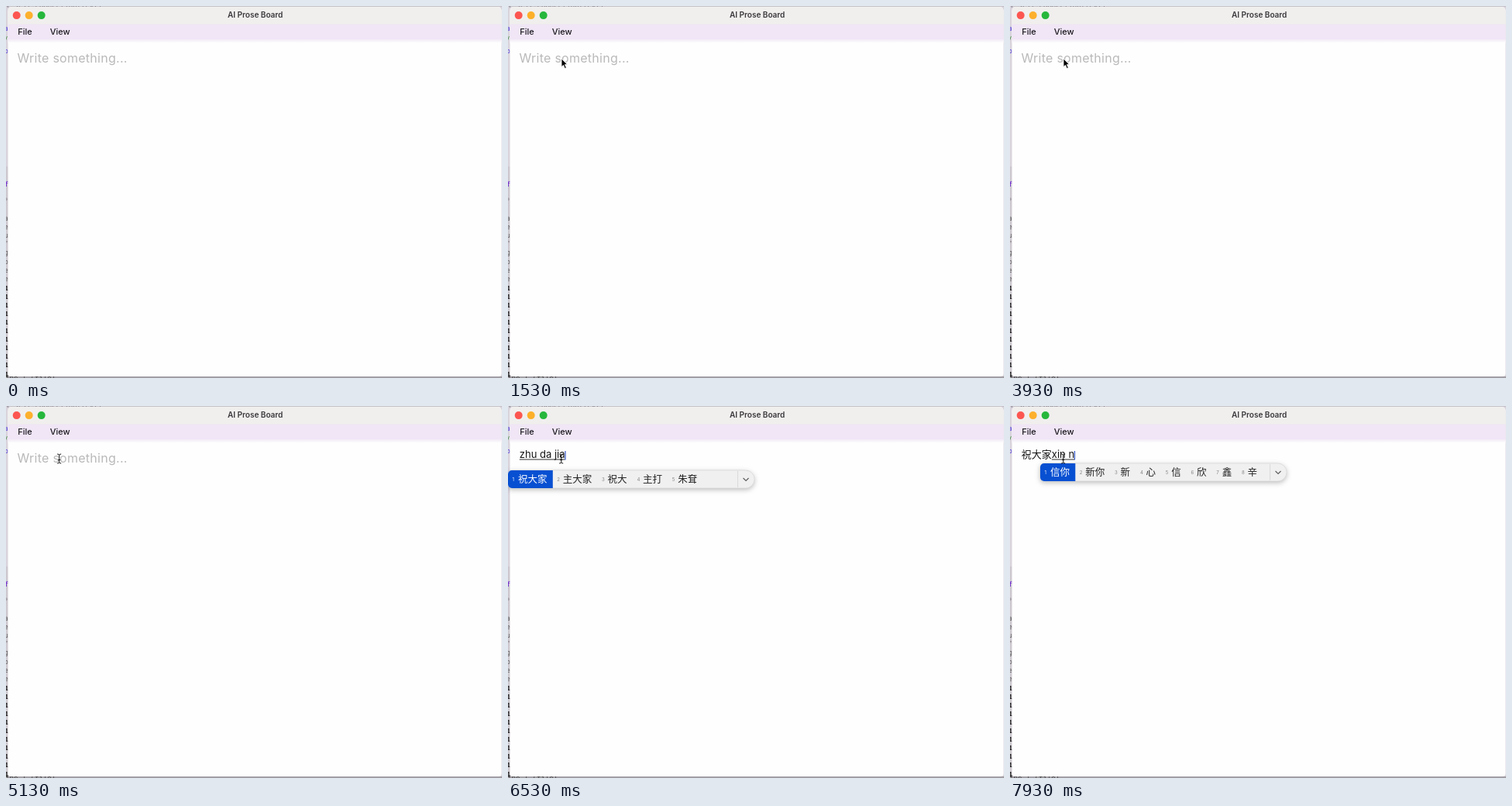
Animation of 640x480 px, one loop 8 s. Source, as an HTML page:

```html
<!DOCTYPE html>
<html lang="zh-CN">
<head>
<meta charset="utf-8">
<title>AI Prose Board</title>
<style>
html, body { margin: 0; width: 100%; height: 100%; overflow: hidden; background: #fefefe; }
svg { display: block; width: 640px; height: 480px; }
text { font-family: Inter, "Noto Sans CJK SC", "Noto Sans CJK", sans-serif; white-space: pre; }
#behind text { font: 9px "Noto Sans Mono", monospace; text-anchor: end; }
#hint { font-size: 16px; letter-spacing: .27px; fill: #b9b9b9; }
.menu { font-size: 11px; font-weight: 500; fill: #1d1a20; }
.typed { font-size: 13px; fill: #161616; }
.digit { font-size: 6px; fill: #858585; }
.word { font-size: 12.5px; fill: #222; }
.chosen { fill: #fff; }
#popup { filter: drop-shadow(0 2px 3px rgba(0, 0, 0, .25)); }
</style>
</head>
<body>
<svg id="stage" viewBox="0 0 640 480" xmlns="http://www.w3.org/2000/svg">
  <defs>
    <linearGradient id="fade" x2="0" y2="1">
      <stop stop-color="#f3ecf7"/><stop offset="1" stop-color="#fefefe"/>
    </linearGradient>
  </defs>
  <rect width="640" height="480" fill="#d9d3dc"/>
  <rect width="640" height="1" fill="#c6c2c8"/>
  <rect y="207" width="4" height="273" fill="#cdc8cf"/>
  <rect y="478" width="640" height="2" fill="#a29ea4"/>
  <g id="behind"></g>
  <path d="M2.500 474V6a5 5 0 0 1 5-5H634.500a5 5 0 0 1 5 5V474a4 4 0 0 1-4 4H6.500a4 4 0 0 1-4-4z" fill="#fefefe"/>
  <path d="M2.500 24V6a5 5 0 0 1 5-5H634.500a5 5 0 0 1 5 5V24z" fill="#f0efee"/>
  <rect x="2.500" y="23.500" width="637" height="20" fill="#f0e6f6"/>
  <rect x="2.500" y="43.500" width="637" height="4" fill="url(#fade)"/>
  <circle cx="13.700" cy="12.100" r="5" fill="#fc5650"/>
  <circle cx="29.700" cy="12.100" r="5" fill="#fcb02c"/>
  <circle cx="45.700" cy="12.100" r="5" fill="#26b73c"/>
  <text x="321.700" y="15.400" text-anchor="middle" font-size="10" font-weight="600" fill="#3a383b">AI Prose Board</text>
  <text class="menu" x="15.300" y="37.200">File</text>
  <text class="menu" x="56.700" y="37.200">View</text>
  <text id="hint" x="14.600" y="73.300">Write something...</text>
  <text id="done" class="typed" x="14.800" y="67.200"></text>
  <text id="draft" class="typed" y="67.200"></text>
  <rect id="underline" y="68.500" height="1" fill="#333"/>
  <rect id="caret" y="58" width="1.200" height="11.500" fill="#3458c8"/>
  <g id="popup">
    <path d="M5 0H306.500a11.500 11.500 0 0 1 0 23H5a5 5 0 0 1-5-5V5a5 5 0 0 1 5-5z" fill="#f0f0f0" stroke="#d2d2d2" stroke-width=".6"/>
    <path id="selection" fill="#0850d2"/>
    <g id="words"></g>
    <path d="M296.500 1V22" stroke="#dadada"/>
    <path d="M303.500 10l3.500 3.500 3.500-3.500" fill="none" stroke="#606060" stroke-width="1.200"/>
  </g>
  <path id="arrow" d="M0 0V10.600l2.500-2.300 1.900 4.300 1.900-.8-1.900-4.200H7.600z" fill="#000" stroke="#fff" stroke-width=".8"/>
  <path id="beam" d="M-2.500-6q2.500 0 2.500 1.500q0-1.500 2.500-1.500M0-4.500V4.500M-2.500 6q2.500 0 2.500-1.500q0 1.500 2.500 1.500M-1.500 1.500h3" fill="none" stroke="#111" stroke-width="1" transform="translate(68.700 68)"/>
</svg>
<script>
const LOOP = 8000, LEFT = 14.8, CHAR = 12.5, PAD = 20.3;
const $ = id => document.getElementById(id);
const show = (id, on) => $(id).setAttribute("visibility", on ? "visible" : "hidden");

function add(parent, x, y, content, className, fill) {
  const node = document.createElementNS("http://www.w3.org/2000/svg", "text");
  node.setAttribute("x", x);
  node.setAttribute("y", y);
  if (className) node.setAttribute("class", className);
  if (fill) node.setAttribute("fill", fill);
  node.textContent = content;
  parent.append(node);
  return node;
}

// Slivers of the windows lying underneath
const behind = $("behind");
add(behind, 3, 32, "a", "", "#4a35d8");
add(behind, 3, 46, "/", "", "#3c8a3c");
add(behind, 3, 61, "o", "", "#4a35d8");
add(behind, 3.5, 233, "f", "", "#6a1fd0");
add(behind, 3, 252, "●", "", "#aaa5ad");
[..."aeu\"goee"].forEach((c, i) => add(behind, 3, 277 + i * 11.1, c, "", "#555"));
for (let i = 0; i < 11; i++) add(behind, 3.5, 366.5 + i * 11.1, "1", "", "#222").style.fontWeight = 600;
add(behind, 124, 2, "if self.connection(text)", "", "#77727d");
add(behind, 434, 2, "_", "", "#77727d");
add(behind, 64, 483, "line 1 (file)", "", "#444");

// time, committed text, text being composed, candidates
const steps = [
  [5270, "", "z", ""],
  [5330, "", "z", "在 这 中 再 最 着 做 之"],
  [5400, "", "zh", "这 中 着 只 之 真 找 总"],
  [5530, "", "zhu", "住 主 祝 注 猪 朱 助 竹"],
  [5670, "", "zhu d", "主动 主打 祝 住 主 注 猪"],
  [5800, "", "zhu da", "祝大 祝大家 主打 朱耷 主答 住"],
  [6270, "", "zhu da j", "祝大家 主打歌 祝大 主打 朱耷"],
  [6400, "", "zhu da ji", "祝大吉 主打击 祝大 主打 朱耷"],
  [6530, "", "zhu da jia", "祝大家 主大家 祝大 主打 朱耷"],
  [6870, "祝大家", "", ""],
  [7470, "祝大家", "x", ""],
  [7530, "祝大家", "x", "想 下 小 写 新 行 些 学"],
  [7600, "祝大家", "xi", "系 西 洗 喜 细 戏 习 吸"],
  [7730, "祝大家", "xin", "新 心 信 欣 鑫 辛 馨 薪"],
  [7870, "祝大家", "xin n", "新年 信你 新 心 信 欣 鑫 辛"],
  [7930, "祝大家", "xin n", "信你 新你 新 心 信 欣 鑫 辛"]
];

function setCandidates(list, left) {
  const words = $("words");
  words.replaceChildren();
  let x = 0;
  list.split(" ").forEach((word, i) => {
    const chosen = i ? "" : " chosen";
    add(words, x + 5.5, 14, i + 1, "digit" + chosen);
    add(words, x + 13, 16.3, word, "word" + chosen);
    x += word.length * CHAR + PAD;
    if (!i) $("selection").setAttribute("d", `M5 0H${x}V23H5a5 5 0 0 1-5-5V5a5 5 0 0 1 5-5z`);
  });
  $("popup").setAttribute("transform", `translate(${left} ${left > 0 ? 74 : 83})`);
}

let current;
function setTyping(step) {
  if (step === current) return;
  current = step;
  const [, done, draft, list] = step || [0, "", "", ""];
  $("done").textContent = done;
  $("draft").textContent = draft;
  const start = LEFT + done.length * 13;
  const width = draft ? $("draft").getComputedTextLength() : 0;
  $("draft").setAttribute("x", start);
  $("underline").setAttribute("x", start);
  $("underline").setAttribute("width", width);
  $("caret").setAttribute("x", start + width - .2);
  show("hint", !step);
  show("caret", step);
  show("popup", list);
  if (list) setCandidates(list, done ? 39 : 0);
}

// time, x, y of the arrow tip
const path = [[470, 160, 460], [670, 112, 262], [870, 87, 143], [1270, 70, 75], [1530, 69, 68]];

function arrowAt(t) {
  const i = path.findIndex(p => p[0] > t);
  if (i < 0) return path.at(-1).slice(1);
  const a = path[i - 1], b = path[i];
  const k = (t - a[0]) / (b[0] - a[0]);
  const eased = i > 2 ? 1 - (1 - k) ** 2 : k;
  return [1, 2].map(n => a[n] + (b[n] - a[n]) * eased);
}

function draw(t) {
  setTyping(steps.findLast(s => s[0] <= t) || null);
  const arrow = t >= 470 && t < 4800;
  show("arrow", arrow);
  show("beam", t >= 4800);
  if (arrow) $("arrow").setAttribute("transform", `translate(${arrowAt(t)})`);
}

const begin = performance.now();
function frame() {
  draw((performance.now() - begin) % LOOP);
  requestAnimationFrame(frame);
}
frame();
</script>
</body>
</html>
```
